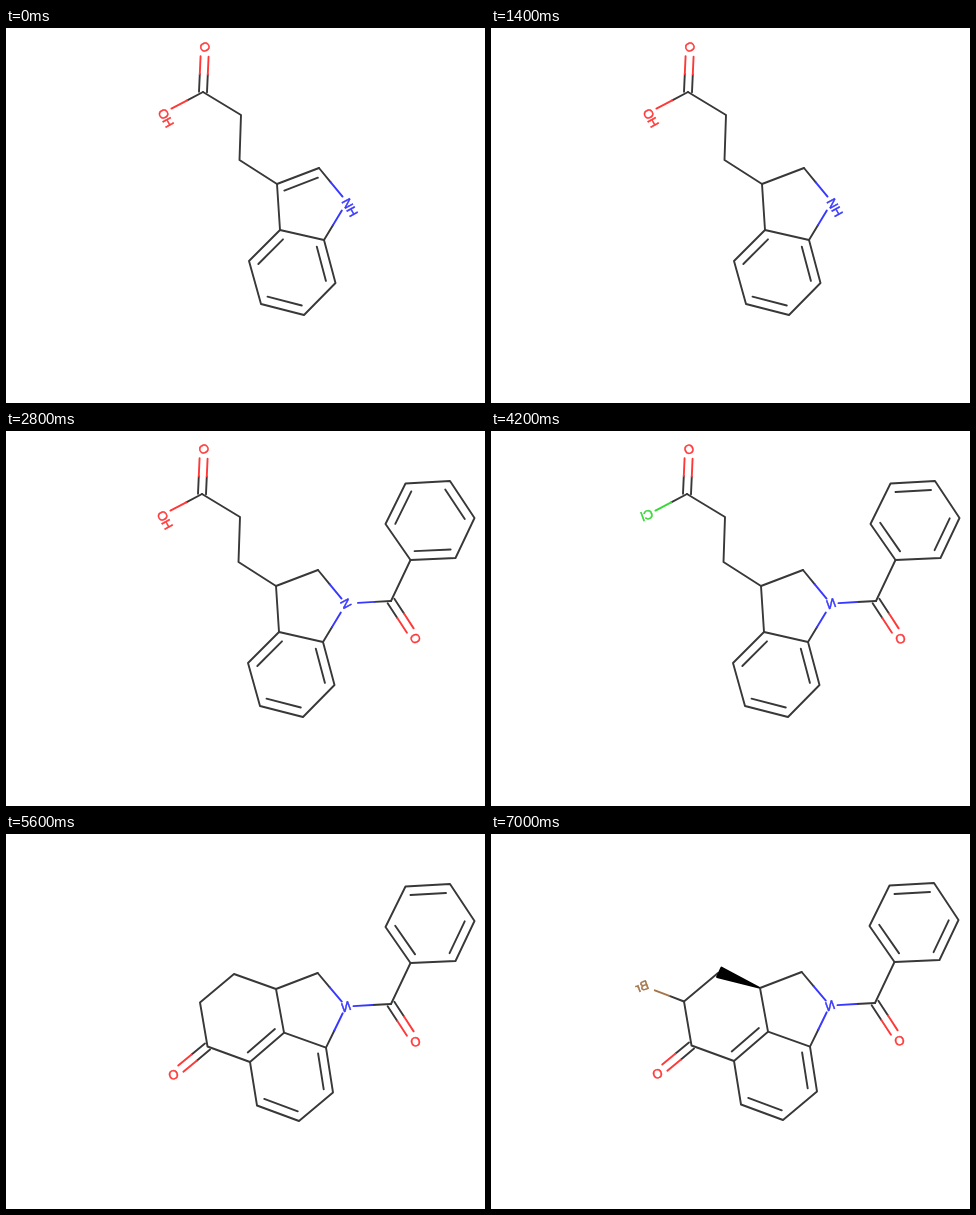
Animation of 479 by 375 pixels, one loop 8000 ms. Source, as an HTML page:

```html
<!DOCTYPE html>
<html lang="en">
<head>
<meta charset="utf-8">
<title>Indoline synthesis</title>
<style>
html, body { margin: 0; width: 100%; height: 100%; overflow: hidden; background: #fff; }
svg { display: block; width: 479px; height: 375px; overflow: hidden; }
#strip { animation: steps 8s step-end infinite; }
@keyframes steps {
  0% { transform: translateX(0); }
  17.5% { transform: translateX(-479px); }
  35% { transform: translateX(-958px); }
  52.5% { transform: translateX(-1437px); }
  70% { transform: translateX(-1916px); }
  87.5% { transform: translateX(-2395px); }
}
path { fill: none; stroke-width: 1.9; stroke-linecap: round; stroke-linejoin: round; }
text { font: 13px "Liberation Sans", Arial, sans-serif; text-anchor: middle; stroke-width: .5; }
</style>
</head>
<body>
<svg viewBox="0 0 479 375"><g id="strip"></g></svg>
<script>
const INK = '#383838', RED = '#ff3838', BLUE = '#3838ff', GREEN = '#38d838', BROWN = '#a5754a';
const TURNED = 'rotate(61)', MIRRORED = 'rotate(-20) scale(-1 1)';

const lerp = (a, b, t) => [a[0] + (b[0] - a[0]) * t, a[1] + (b[1] - a[1]) * t];
const dist = (a, b) => Math.hypot(b[0] - a[0], b[1] - a[1]);
const center = pts => [0, 1].map(i => pts.reduce((s, p) => s + p[i], 0) / pts.length);
const normal = (a, b) => [(a[1] - b[1]) / dist(a, b), (b[0] - a[0]) / dist(a, b)];
const shift = (p, n, k) => [p[0] + n[0] * k, p[1] + n[1] * k];

const line = (pts, color = INK) => `<path d="M${pts.join('L')}" stroke="${color}"/>`;
const ring = pts => line([...pts, pts[0]]);

// Second stroke of a double bond, on the side of point c
function inner(a, b, c) {
  const n = normal(a, b);
  const side = Math.sign(n[0] * (c[0] - a[0]) + n[1] * (c[1] - a[1]));
  const t = 4.5 / dist(a, b);
  return line([lerp(a, b, t), lerp(a, b, 1 - t)].map(p => shift(p, n, side * 8.7)));
}

// Every other ring edge doubled, beginning at edge "first"
function aromatic(pts, first) {
  const c = center(pts);
  return ring(pts) + [0, 2, 4].map(i =>
    inner(pts[(i + first) % 6], pts[(i + first + 1) % 6], c)).join('');
}

// Bond from a carbon to a labelled atom, in two colours
function bond(a, b, color, cut = 9.5, gaps = [0]) {
  const end = lerp(a, b, 1 - cut / dist(a, b)), mid = lerp(a, end, .5), n = normal(a, b);
  return gaps.map(g => {
    const [p, q, r] = [a, mid, end].map(v => shift(v, n, g));
    return line([p, q]) + line([q, r], color);
  }).join('');
}

const label = (s, [x, y], color, spin) =>
  `<text transform="translate(${x} ${y}) ${spin}" dy=".36em" fill="${color}" stroke="${color}">${s}</text>`;

const carbonyl = (c, o, spin) => bond(c, o, RED, 9.5, [-4, 4]) + label('O', o, RED, spin);

const acid = [197, 64], acidO = [199, 19], acidX = [157, 85];
const c3 = [271, 156], c2 = [313, 140], n1 = [341, 174];
const benzo = [[274, 202], [243, 233], [255, 276], [298, 287], [329.5, 255], [318, 212]];

function indoline(spin) {
  return line([acid, [235, 87], [233.5, 132], c3, c2]) + line([c3, benzo[0]]) +
    aromatic(benzo, 0) + carbonyl(acid, acidO, spin) +
    bond(c2, n1, BLUE, 7) + bond(benzo[5], n1, BLUE, 10);
}
const hydroxyl = bond(acid, acidX, RED) + label('OH', [160, 90], RED, TURNED);
const amine = label('NH', [344, 179.5], BLUE, TURNED);

const phenyl = [[404.5, 129], [379.5, 93], [399.5, 52.5], [444, 50], [468.5, 87], [449.5, 127]];
const amideN = [340, 172.5], amideC = [385, 170], amideO = [409.5, 207.5];

function benzoyl(spin, first, cut) {
  return aromatic(phenyl, first) + line([phenyl[0], amideC]) + carbonyl(amideC, amideO, spin) +
    bond(amideC, amideN, BLUE, cut) + label('N', amideN, BLUE, spin);
}

const six = [[270, 155], [228, 140], [194, 168.5], [201.5, 212.5], [244, 228], [278, 198.7]];
const arene = [six[5], [320, 213.7], [327, 258.5], [293, 287], [251, 271.5], six[4]];
const ch2 = [311.7, 139], ketoneO = [167.5, 240.7];

function tricycle(chain) {
  const c = center(arene);
  return line([...chain, six[2], six[3], six[4], six[5], six[0], ch2]) +
    line(arene) + inner(six[4], six[5], center(six)) +
    inner(arene[1], arene[2], c) + inner(arene[3], arene[4], c) +
    bond(ch2, amideN, BLUE, 6.5) + bond(arene[1], amideN, BLUE, 7.5) +
    carbonyl(six[3], ketoneO, MIRRORED) + benzoyl(MIRRORED, 0, 7.5);
}

const move = (s, d = -1) => `<g transform="translate(${d} ${d})">${s}</g>`;
const bromine = bond(six[2], [155, 153.5], BROWN, 10.5) + label('Br', [152, 153], BROWN, MIRRORED);
const wedge = '<path d="M269 154.5L231.5 134.5L227 144Z" style="fill:#000;stroke:#000"/>';

const scenes = [
  indoline(TURNED) + hydroxyl + amine + inner(c3, c2, n1),
  indoline(TURNED) + hydroxyl + amine,
  move(indoline(TURNED) + hydroxyl) + benzoyl(TURNED, 1, 12),
  move(indoline(MIRRORED) + bond(acid, acidX, GREEN) +
    label('Cl', [157, 85], GREEN, MIRRORED)) + benzoyl(MIRRORED, 0, 7.5),
  tricycle([six[0], six[1]]),
  move(tricycle([six[1]]) + bromine + wedge)
];

document.getElementById('strip').innerHTML = scenes.map((s, i) =>
  `<g transform="translate(${i * 479} 0)">${s}</g>`).join('');
</script>
</body>
</html>
```
